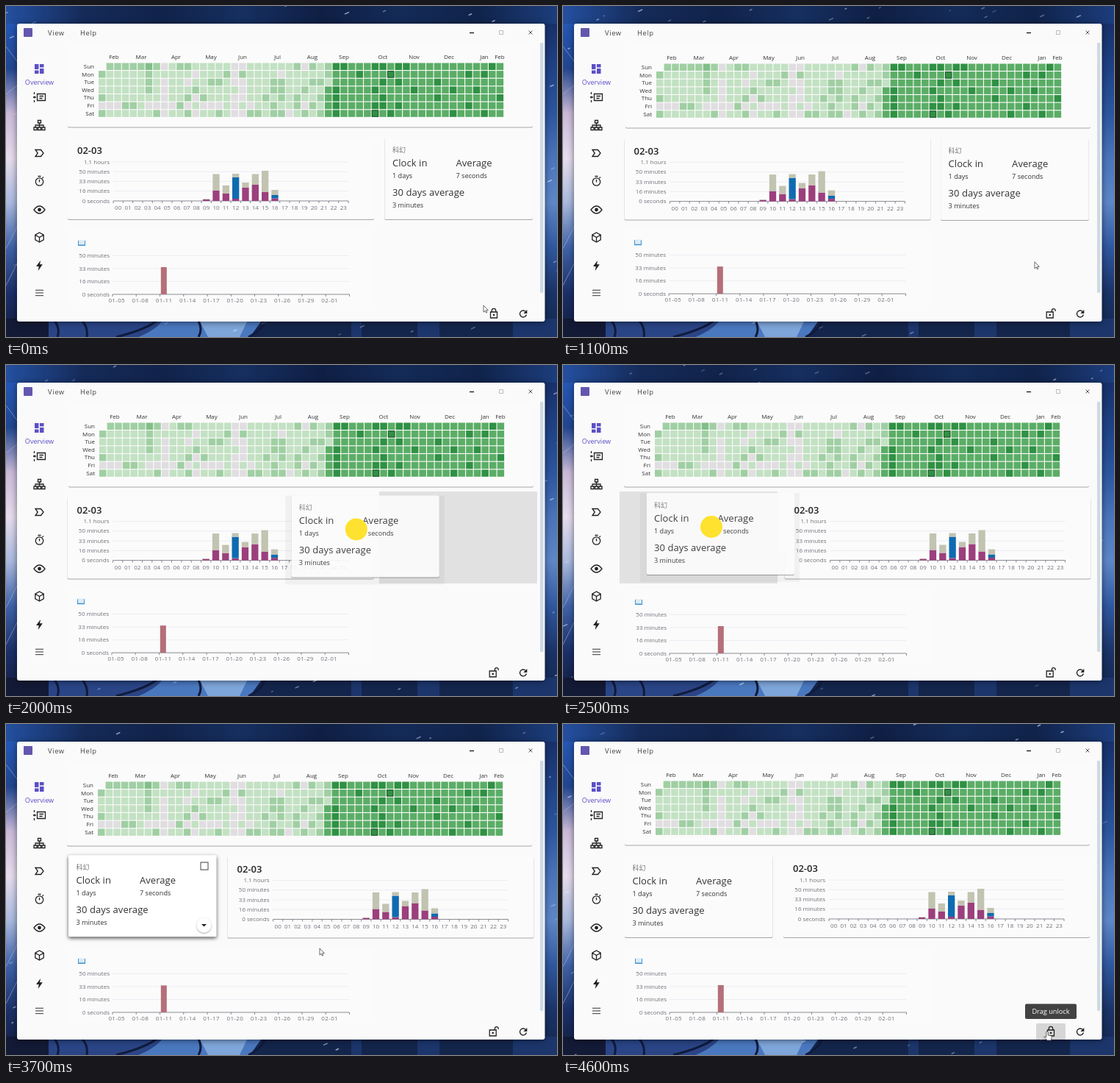
Animation, 750 px wide and 450 px high, one loop 4700 ms. Source, as an HTML page:

```html
<!DOCTYPE html>
<html lang="en">
<head>
<meta charset="utf-8">
<title>Dashboard drag</title>
<style>
html, body { margin: 0; height: 100%; overflow: hidden; background: #12264f; }
svg { display: block; width: 100vw; height: 100vh; }
text { font: 8px "Open Sans", "Noto Sans", "Noto Sans CJK SC", sans-serif; fill: #333; white-space: pre; }
.mid { text-anchor: middle; }
.end { text-anchor: end; }
.axis { fill: #6e7079; }
.date { letter-spacing: .35px; }
.menu { font-size: 9.4px; letter-spacing: .6px; fill: #444; }
.bold { font-size: 13px; font-weight: 600; fill: #222; }
.big { font-size: 13px; letter-spacing: .06px; }
.small { font-size: 9.1px; }
.genre { font-size: 9px; fill: #777; font-family: "Noto Sans CJK SC", "Noto Sans CJK", sans-serif; }
.card { fill: #fbfbfb; filter: drop-shadow(0 1px .6px #0005); }
.hover .card { fill: #fff; filter: drop-shadow(0 2px 2.5px #000a); }
.line { fill: none; stroke: #222; stroke-width: 1.3; }
.pointer { fill: #fff; stroke: #444; stroke-width: .8; stroke-linejoin: round; }
</style>
</head>
<body>
<svg id="stage" viewBox="0 0 750 450" preserveAspectRatio="none"></svg>
<script>
const LOOP = 4700, STEP = 100;
const stage = document.getElementById('stage');

const rect = (x, y, w, h, fill, more = '') =>
  `<rect x="${x}" y="${y}" width="${w}" height="${h}" fill="${fill}" ${more}/>`;
const text = (x, y, s, cls = '', more = '') => `<text x="${x}" y="${y}" class="${cls}" ${more}>${s}</text>`;
const path = (d, more = 'class="line"') => `<path d="${d}" ${more}/>`;
const icon = (x, y, body, more = '') => `<g transform="translate(${x} ${y})" ${more}>${body}</g>`;
const group = (id, body, more = '') => `<g id="${id}" ${more}>${body}</g>`;
const card = (x, y, w, h) => rect(x, y, w, h, '#fbfbfb', 'rx="2" class="card"');
const range = n => [...Array(n).keys()];
const gradient = (id, dir, colors) => `<linearGradient id="${id}" ${dir}>` +
  colors.map((c, i) => `<stop offset="${i / (colors.length - 1)}" stop-color="${c}"/>`).join('') +
  '</linearGradient>';

let seed = 11;
const random = () => (seed = (seed * 16807) % 2147483647) / 2147483647;

// Wallpaper
const flakes = range(120).map(() => ({
  x: random() * 750, y: random() * 450, size: 1 + random() * 4, alpha: .2 + random() * .5
}));

function wallpaper() {
  const down = 'x2="0" y2="1"';
  return '<defs>' +
    gradient('top', '', ['#2450a0', '#152a58', '#11234a', '#162f60', '#0f1f44', '#142b58', '#10234a', '#1c3d7c']) +
    gradient('left', down, ['#2457b5', '#22468f', '#c9b9d8', '#e6dcec', '#a9b9de', '#3f62a8', '#1b3068', '#121c3e']) +
    gradient('right', down, ['#17306a', '#1f4286', '#2b569f', '#4a74bb', '#5d87c8', '#2f579f', '#1a3468', '#13264f']) +
    '</defs>' +
    rect(0, 0, 750, 40, 'url(#top)') + rect(0, 24, 30, 426, 'url(#left)') +
    rect(720, 24, 30, 426, 'url(#right)') + rect(0, 425, 750, 25, '#14254c') +
    path('M0 425H58V450H0Z', 'fill="#131a36"') +
    path('M58 425H215Q205 440 180 450H58Z', 'fill="#2a4586"') +
    path('M215 425H350L332 450H180Q205 440 215 425Z', 'fill="#4a78bf"') +
    path('M262 425H330L318 450H275Z', 'fill="#7ea6da"') +
    path('M70 450Q74 438 66 428M110 450Q112 438 104 428M150 450Q190 440 205 428M262 450Q268 440 262 428M330 450Q350 440 352 428',
      'fill="none" stroke="#101b3c" stroke-width="3"') +
    path('M470 425h14v25h-14ZM560 425h30v25h-30ZM690 425h60v25h-60Z', 'fill="#24498c" opacity=".5"') +
    path('M0 55L15 75M0 120L15 108M0 330L15 300M0 380L15 350', 'stroke="#b9c7ee" opacity=".5"') +
    group('snow', flakes.map(f => path(`M0 0l${f.size} ${-f.size * .45}`,
      `stroke="#dbe8ff" stroke-width="1.6" stroke-linecap="round" opacity="${f.alpha}"`)).join(''));
}

// Window frame and side bar
function frame() {
  const side = [
    [124, path('M-7-7v3M-7-1.5v3M-7 4v3M-8.5 0h4M-3-4.5H8V4.5H-3ZM0-1.5H5.5M0 1.5H4')],
    [162, path('M-2-6.5h4v3.5h-4ZM-7.5 3h4v3.5h-4ZM-2 3h4v3.5h-4ZM3.5 3h4v3.5h-4ZM0-3V3M-5.5 3V0H5.5V3')],
    [200, path('M-5.5-4.5H2L5.5 0 2 4.5H-5.5L-2.3 0Z')],
    [238, '<circle cy="1" r="5.2" class="line"/>' + path('M-2-6.5h4M0-2v3.5M4-4l1.5-1.5')],
    [277, path('M-7.5 0Q0-10 7.5 0Q0 10-7.5 0Z') + '<circle r="2.4" fill="#222"/>'],
    [314.5, path('M0-6.5L5.7-3.3V3.3L0 6.5-5.7 3.3V-3.3ZM-5.7-3.3L0 0 5.7-3.3M0 0V6.5')],
    [353, path('M1.5-7L-4.5 1H-.8L-1.7 7 4.3-1.8H.6Z', 'fill="#222"')],
    [390, path('M-5.5-3.7h11M-5.5 0h11M-5.5 3.7h11', 'stroke="#333"')]
  ];
  return rect(15, 24, 718.5, 405, '#fafafa', 'rx="3" style="filter:drop-shadow(0 1px 4px #0008)"') +
    rect(24, 30, 12, 12, '#6257ae', 'rx="1"') +
    text(57, 39.5, 'View', 'menu') + text(101, 39.5, 'Help', 'menu') +
    path('M631 36.5h6', 'stroke="#222" stroke-width="1.4"') +
    path('M671.5 33.5h5v5h-5Z', 'fill="none" stroke="#bbb"') +
    path('M711.5 33.5l5 5M716.5 33.5l-5 5', 'stroke="#555"') +
    rect(727, 50, 4.5, 340, '#cfdae3', 'rx="1"') +
    rect(39, 79, 5.5, 7, '#5b4fc7') + rect(39, 87.5, 5.5, 4.5, '#5b4fc7') +
    rect(46, 79, 5.5, 4.5, '#5b4fc7') + rect(46, 85, 5.5, 7, '#5b4fc7') +
    text(45.5, 107, 'Overview', 'mid small', 'style="fill:#5b4fc7"') +
    side.map(([y, body]) => icon(45.5, y, body)).join('');
}

// Year heat map
const DARKEST = [
  [30, 31, 35, 36, 38, 39, 50], [33, 37, 47, 49], [36, 38, 43], [30, 35, 40, 45, 48],
  [30, 36, 43, 51], [30, 35, 36, 38, 47], [30, 35, 37, 45, 49]
];
function shade(col, row) {
  const a = random(), b = random();
  if (DARKEST[row].includes(col)) return '#2f9143';
  if (col >= (row < 3 ? 30 : 29)) return '#5bad66';
  if (row === 0 && col < 8) return col === 6 ? '#82bf88' : '#a0cfa3';
  const bare = [8, 17, 18].includes(col) ? .75 : [12, 26].includes(col) ? .4
    : row === 5 && col < 20 ? .55 : col > 6 && col < 28 ? .08 : 0;
  if (a < bare) return '#e0dee0';
  return b < (col > 21 ? .42 : .25) ? '#a0cfa3' : '#c3e1c3';
}
function heatmap() {
  const months = { 147: 'Feb', 184: 'Mar', 231.5: 'Apr', 279: 'May', 322: 'Jun', 369.5: 'Jul', 417: 'Aug',
    460: 'Sep', 513: 'Oct', 555.5: 'Nov', 603: 'Dec', 651: 'Jan', 672: 'Feb' };
  const cellX = c => 126 + c * 10.62, cellY = r => 77.5 + r * 10.64;
  let out = card(84, 54, 633, 110.5);
  for (const x in months) out += text(x, 72, months[x], 'mid');
  ['Sun', 'Mon', 'Tue', 'Wed', 'Thu', 'Fri', 'Sat'].forEach((day, r) => {
    out += text(120, cellY(r) + 7.4, day, 'end');
    for (let c = r ? 0 : 1; c < 52; c++) out += rect(cellX(c), cellY(r), 9.5, 9.5, shade(c, r));
  });
  for (const [c, r] of [[37, 1], [35, 6]])
    out += rect(cellX(c) + .5, cellY(r) + .5, 8.5, 8.5, '#2f9143', 'stroke="#111" stroke-dasharray="1 1"');
  return out;
}

// Bar charts
function axes(left, right, bottom, gap, labels, ticks) {
  let out = '';
  labels.forEach((s, i) => {
    const y = bottom - i * gap;
    out += text(141, y + 2.5, s, 'axis end');
    if (i) out += path(`M${left} ${y}H${right}`, 'stroke="#e6eaf1" stroke-width=".8"');
  });
  const marks = range(ticks + 1).map(i => `M${left + i * (right - left) / ticks} ${bottom}v3`).join('');
  return out + path(`M${left} ${bottom}H${right}${marks}`, 'stroke="#6e7079" stroke-width=".8"');
}
function dayChart() {
  const PURPLE = '#9c3f7d', BLUE = '#0f6bb0', OLIVE = '#c2c3b0', left = 146, bin = 320 / 24;
  // hour: heights of the purple, blue and olive parts
  const hours = { 9: [2, 0, .6], 10: [14, 0, 22.5], 11: [10, 0, 11], 12: [3, 29, 5], 13: [18, 0, 7],
    14: [22, 0, 14.5], 15: [12, 0, 29], 16: [3.5, 4.5, 7] };
  let out = card(84, 179, 417, 111) + text(97, 201, '02-03', 'bold') +
    axes(left, left + 320, 265, 13.25, ['0 seconds', '16 minutes', '33 minutes', '50 minutes', '1.1 hours'], 24);
  for (const h in hours) {
    let y = 265;
    hours[h].forEach((v, i) => {
      y -= v;
      if (v) out += rect(left + bin * h + 2, y, 9.3, v, [PURPLE, BLUE, OLIVE][i]);
    });
  }
  return out + range(24).map(h =>
    text(left + bin * (h + .5), 277, String(h).padStart(2, '0'), 'axis mid')).join('');
}
function monthChart() {
  const dates = ['01-05', '01-08', '01-11', '01-14', '01-17', '01-20', '01-23', '01-26', '01-29', '02-01'];
  return card(84, 304, 417, 125) +
    path('M98 319h10v7H98Z', 'fill="#3f93d2"') + path('M99 318.5q2-1 4 .6q2-1.6 4-.6v6H99Z', 'fill="#dcebf4"') +
    axes(145, 467.5, 392, 17.5, ['0 seconds', '16 minutes', '33 minutes', '50 minutes'], 10) +
    rect(210.8, 355, 8, 37, '#b56f78', 'id="bar"') +
    dates.map((d, i) => text(150.7 + i * 32.22, 402.5, d, 'axis mid date')).join('');
}
function stats() {
  return rect(507, 179, 217, 121, '#0000000a', 'id="wrap" style="filter:drop-shadow(0 1px 1px #0003)"') +
    card(515.5, 179, 201.5, 111) + text(526, 198.5, '科幻', 'genre') +
    text(526, 218, 'Clock in', 'big') + text(612.5, 218, 'Average', 'big') +
    text(526, 234, '1 days', 'small') + text(612.5, 234, '7 seconds', 'small') +
    text(526, 258, '30 days average', 'big') + text(526, 274, '3 minutes', 'small') +
    group('tools', path('M695.5 189h10v10h-10Z', 'fill="none" stroke="#666" stroke-width="1.2"') +
      '<circle cx="700" cy="274.5" r="10" fill="#fff" style="filter:drop-shadow(0 1px 1px #0005)"/>' +
      path('M696.5 272.8h7l-3.5 3.5Z', 'fill="#222"'));
}

function footer() {
  return rect(644, 407, 40, 22, '#d6d6d6', 'id="button" rx="2"') +
    group('lock', path('M-4.5-2H4.5V6H-4.5Z') + '<circle cy="2" r="1.3" fill="#222"/>' +
      path('M-2.7-2V-4a2.7 2.7 0 0 1 5.4 0V-2', 'id="closed" class="line"') +
      path('M2.7-2V-4a2.4 2.4 0 0 1 4.8 0V-3', 'id="open" class="line"')) +
    icon(704, 418.5, path('M3.2-3.2A4.5 4.5 0 1 0 4.4 1') + path('M5.3-5.5V-.5H.3Z', 'fill="#222"')) +
    group('tip', rect(0, 380.5, 60, 20.5, '#424242', 'id="tipBox" rx="2"') +
      text(664, 394, '', 'mid', 'id="tipText" style="fill:#fff;font-size:9.2px"'));
}

stage.innerHTML = wallpaper() + frame() +
  '<clipPath id="view"><rect x="70" y="49" width="657" height="357.5"/></clipPath><g clip-path="url(#view)">' +
  rect(77, 172, 215, 125, '#e1e1e1', 'id="slot"') +
  group('heat', heatmap()) + group('day', dayChart()) + group('month', monthChart()) + group('stats', stats()) +
  '</g>' + footer() +
  path('M0 0V9.2L2.1 7.3 3.5 10.2 4.8 9.6 3.5 6.7H6.3Z', 'id="arrow" class="pointer"') +
  path('M-1.2 1.2a1.2 1.2 0 0 1 2.4 0V5l4 .9q1.2.4 1 1.7L5.4 12H.2L-4.6 7.4q.4-1.5 3.4.6Z',
    'id="hand" class="pointer"') +
  '<circle id="press" r="15" fill="#fee22f"/>';

const $ = Object.fromEntries([...stage.querySelectorAll('[id]')].map(el => [el.id, el]));
const show = (el, on) => el.style.display = on ? '' : 'none';
const move = (el, x, y) => el.setAttribute('transform', `translate(${x} ${y})`);
const within = (t, a, b) => t >= a && t < b;
const progress = (t, a, b) => Math.min(1, Math.max(0, (t - a) / (b - a)));
const smooth = p => p * p * (3 - 2 * p);

// Jiggle offsets while the layout is unlocked
const SHAKE = {
  heat: [[1, -1], [-1, 1], [1, 1]],
  day: [[-1, .3], [1.5, .5], [-.5, .6]],
  month: [[1.3, 1.2], [0, 0], [-1, -.8]],
  stats: [[-.8, -.4], [1, -.8], [-1.4, 1]]
};
const ROUTE = [[0, 650, 407], [200, 650, 407], [400, 661, 415], [900, 661, 415], [1400, 607, 224], [1600, 604, 225],
  [1700, 604, 225], [2500, 202, 220], [3500, 203, 220], [3700, 427, 305], [4200, 659, 418], [LOOP, 659, 418]];

function pointer(t) {
  const i = ROUTE.findIndex(k => k[0] > t);
  const [a, x, y] = ROUTE[i - 1], [b, u, v] = ROUTE[i];
  const p = smooth(progress(t, a, b));
  return [x + (u - x) * p, y + (v - y) * p];
}

function draw(t) {
  const [x, y] = pointer(t);
  const locked = t < 600 || t >= 4500;
  const drag = within(t, 1700, 2600);
  const onLock = within(t, 400, 1000) || t >= 4200;
  const hover = within(t, 1300, 1700) || within(t, 2600, 3800);
  const swapped = t >= 2100;

  const home = { heat: [0, 0], month: [0, 0], day: [216 * smooth(progress(t, 2100, 2300)), 0] };
  const settle = 1 - smooth(progress(t, 2500, 2800));
  home.stats = drag ? [x - 604, y - 225]
    : swapped ? [-431.5 + 29.5 * settle, -5 * settle] : [0, 0];
  for (const id in SHAKE) {
    const [dx, dy] = locked || (id === 'stats' && drag) ? [0, 0] : SHAKE[id][t / STEP % 3];
    move($[id], home[id][0] + dx, home[id][1] + dy);
  }

  $.stats.setAttribute('class', hover ? 'hover' : '');
  $.stats.setAttribute('opacity', drag ? .93 : 1);
  show($.tools, hover);
  show($.wrap, drag);
  show($.slot, drag);
  $.slot.setAttribute('x', swapped ? 77 : 508);

  const grow = t < 3000 ? 1 : 1 - (1 - progress(t, 3000, 3900)) ** 3;
  $.bar.setAttribute('height', 37 * grow);
  $.bar.setAttribute('y', 392 - 37 * grow);

  move($.lock, locked ? 664 : 662.7, 418);
  show($.closed, locked);
  show($.open, !locked);
  show($.button, onLock);
  show($.tip, within(t, 400, 900) || t >= 4300);
  $.tipText.textContent = locked ? 'Drag unlock' : 'Drag lock';
  const width = locked ? 70 : 60;
  $.tipBox.setAttribute('x', 664 - width / 2);
  $.tipBox.setAttribute('width', width);

  const hand = onLock || hover;
  for (const el of [$.arrow, $.hand, $.press]) move(el, x, y);
  show($.press, drag);
  show($.hand, hand && !drag && !within(t, 3600, 3800));
  show($.arrow, !drag && (!hand || within(t, 3600, 3800)));

  flakes.forEach((f, i) =>
    move($.snow.children[i], (f.x + 750 - 750 * t / LOOP) % 750, (f.y + 450 * t / LOOP) % 450));
}

const start = performance.now();
function tick() {
  const t = (performance.now() - start) % LOOP;
  draw(Math.floor(t / STEP) * STEP);
  requestAnimationFrame(tick);
}
tick();
</script>
</body>
</html>
```
